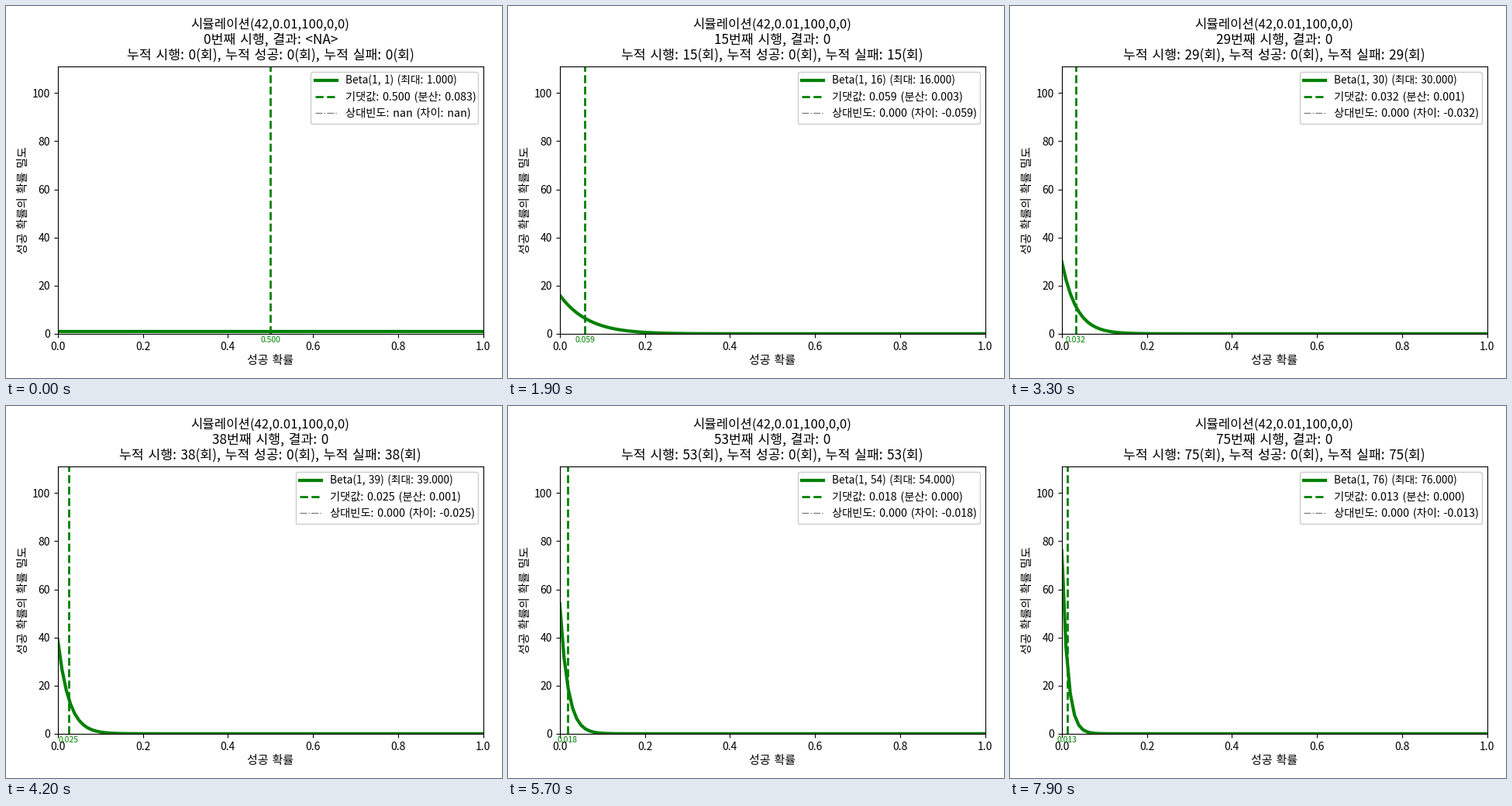
A matplotlib script that plays this animation: 640 by 480 pixels, repeating every 8000 ms.

```python
import numpy as np
import matplotlib.pyplot as plt
from matplotlib.animation import FuncAnimation
from matplotlib.patches import FancyBboxPatch

plt.rcParams["font.family"] = ["Noto Sans CJK JP", "DejaVu Sans"]
W, H = 640, 480
LEFT, RIGHT, TOP, BOTTOM = 66.8, 615.6, 77.88, 422.85
HOLD = 5      # ticks spent on the opening state
TRIALS = 75
WIDE_SPACE = "\u2004"

fig = plt.figure(figsize=(W / 100, H / 100), dpi=100, facecolor="white")
ax = fig.add_axes([LEFT / W, 1 - BOTTOM / H, (RIGHT - LEFT) / W, (BOTTOM - TOP) / H])
ax.set(xlim=(0, 1), ylim=(0, 111.1))
ax.tick_params(labelsize=10)

# Overlay measured in pixels, y downwards
stage = fig.add_axes([0, 0, 1, 1])
stage.set(xlim=(0, W), ylim=(H, 0))
stage.axis("off")


def spaced(text):
    return text.replace(" ", WIDE_SPACE)


def label(x, y, size, text="", ha="center", **kw):
    return stage.text(x, y, spaced(text), size=size, ha=ha, **{"va": "baseline", **kw})


x = np.linspace(0, 1, 101)
curve, = ax.plot(x, np.ones_like(x), color="green", lw=3)
mean_line = ax.axvline(0.5, color="green", ls="--", lw=2)
freq_line = ax.axvline(0, color="gray", ls="-.", lw=1)

MID = (LEFT + RIGHT) / 2
label(MID, 29, 12, "시뮬레이션(42,0.01,100,0,0)")
trial_text = label(MID, 49, 12.4)
total_text = label(MID, 69, 12.4)
label(MID, 462, 10.8, "성공 확률")
label(23.2, 250.5, 10.8, "성공 확률의 확률 밀도", va="center", rotation=90)
mean_text = label(0, 434, 7.5, color="green")

box = FancyBboxPatch((0, 0), 1, 1, boxstyle="round,pad=0,rounding_size=2.8",
                     fc=(1, 1, 1, 0.8), ec="0.8", lw=1, snap=True)
stage.add_patch(box)
ROWS = [(96, 9.85, dict(color="green", ls="-", lw=3)),
        (117, 10.3, dict(color="green", ls="--", lw=2)),
        (138, 10.3, dict(color="gray", ls="-.", lw=1))]
handles = [stage.plot([0, 1], [y, y], **style)[0] for y, _, style in ROWS]
entries = [label(0, y + 4, size, ha="left") for y, size, _ in ROWS]


def set_legend(left, texts):
    box.set_bounds(left - 44.4, 84.8, 608.7 - left + 44.4, 67.5)
    for handle, entry, text in zip(handles, entries, texts):
        handle.set_xdata([left - 38.9, left - 11.1])
        entry.set_x(left)
        entry.set_text(spaced(text))


def draw(tick):
    n = max(0, tick - HOLD + 1)
    a, b = 1, n + 1
    mean = a / (a + b)
    var = a * b / ((a + b) ** 2 * (a + b + 1))
    freq = 0.0 if n else float("nan")

    curve.set_ydata(b * (1 - x) ** n)
    mean_line.set_xdata([mean, mean])
    freq_line.set_visible(n > 0)
    mean_text.set_x(LEFT + mean * (RIGHT - LEFT))
    mean_text.set_text(f"{mean:.3f}")
    trial_text.set_text(spaced(f"{n}번째 시행, 결과: {0 if n else '<NA>'}"))
    total_text.set_text(spaced(
        f"누적 시행: {n}(회), 누적 성공: 0(회), 누적 실패: {n}(회)"))
    set_legend(418 if n else 437.6, [
        f"Beta({a}, {b}) (최대: {b:.3f})",
        f"기댓값: {mean:.3f} (분산: {var:.3f})",
        f"상대빈도: {freq:.3f} (차이: {freq - mean:.3f})"])
    return []


anim = FuncAnimation(fig, draw, frames=HOLD + TRIALS, init_func=lambda: draw(0),
                     interval=100, repeat=True, repeat_delay=0, blit=False)
plt.show()
```
